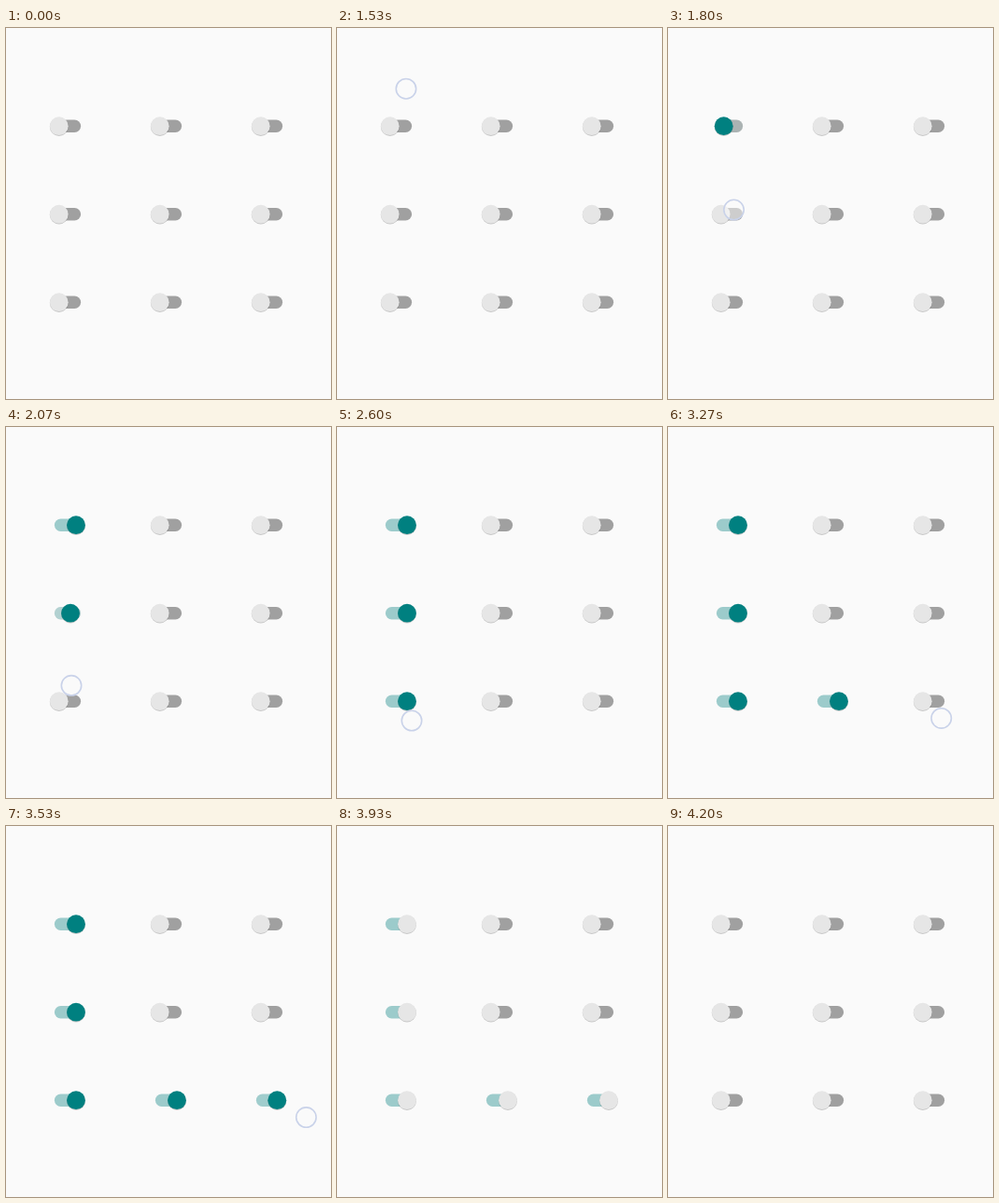
Write an HTML page that moves like this. It is 348x398 px and loops after 4.27 s.

```html
<!DOCTYPE html>
<html lang="en">
<head>
<meta charset="utf-8">
<title>Switches</title>
<style>
  html, body { margin: 0; width: 100%; height: 100%; overflow: hidden; background: #fafafa; }
  svg { display: block; width: 348px; height: 398px; }
</style>
</head>
<body>
<svg id="stage" viewBox="0 0 348 398"></svg>
<script>
const LOOP = 4270, STEP = 1000 / 15;
const TOGGLE = 250, RESET = 3925, TRAVEL = 18.2;
const SHOW = 1530, TURN = 2600, HIDE = 3730;
const FADE = HIDE - STEP;

// Moment at which each touched switch turns on, keyed by "column,row".
const turnOn = { '0,0': 1735, '0,1': 1914, '0,2': 2230, '1,2': 2996, '2,2': 3315 };

const stage = document.getElementById('stage');

function add(parent, tag, attrs) {
  const node = document.createElementNS('http://www.w3.org/2000/svg', tag);
  for (const key in attrs) node.setAttribute(key, attrs[key]);
  return parent.appendChild(node);
}

const clamp = v => Math.min(1, Math.max(0, v));

function eased(time, start) {
  return (1 - Math.cos(Math.PI * clamp((time - start) / TOGGLE))) / 2;
}

// S-curve: power sets the steepness, a smaller lag moves the middle earlier.
function swing(p, power, lag) {
  const done = p ** power;
  return done / (done + lag * (1 - p) ** power);
}

// Down the first column, then along the bottom row with a small wobble.
function pointerAt(time) {
  if (time < TURN) {
    const p = clamp((time - SHOW) / (TURN - SHOW));
    return [74 + 6 * p - 7 * Math.sin(Math.PI * p), 65 + 250 * swing(p, 1.51, 0.179)];
  }
  const p = clamp((time - TURN) / (FADE - TURN));
  const q = swing(p, 2.37, 0.48);
  const wobble = 7 * Math.sin(3 * Math.PI * p) * (1 - p) ** 2;
  return [80 + 242.5 * q, 315 - 2.5 * q + wobble];
}

function makeSwitch(col, row) {
  const g = add(stage, 'g', { transform: `translate(${56.8 + col * 108} ${105.2 + row * 94.5})` });
  const track = { x: -4.9, y: -6.7, width: 28.2, height: 13.4, rx: 6.7 };
  const offTrack = add(g, 'rect', { ...track, fill: '#a0a0a0' });
  const onTrack = add(g, 'rect', { ...track, fill: '#9ccbcb' });
  const thumb = add(g, 'g', {});
  add(thumb, 'circle', { cy: 0.6, r: 10.1, fill: '#000', opacity: 0.07 });
  add(thumb, 'circle', { cy: 0.8, r: 9.9, fill: '#000', opacity: 0.14 });
  const face = add(thumb, 'circle', { r: 9.9 });
  return { offTrack, onTrack, thumb, face, start: turnOn[`${col},${row}`] ?? Infinity };
}

const switches = [];
for (let row = 0; row < 3; row++)
  for (let col = 0; col < 3; col++) switches.push(makeSwitch(col, row));

const pointer = add(stage, 'circle', {
  r: 10.7, fill: '#fafafa', 'fill-opacity': 0.5, stroke: '#c9d2e9', 'stroke-width': 1.6
});

function draw(now) {
  const time = Math.floor((now % LOOP + 5) / STEP) * STEP;

  for (const { offTrack, onTrack, thumb, face, start } of switches) {
    const on = time >= start && time < RESET;
    const p = start < RESET ? eased(time, start) - eased(time, RESET) : 0;
    offTrack.setAttribute('opacity', 1 - p);
    onTrack.setAttribute('opacity', p);
    thumb.setAttribute('transform', `translate(${p * TRAVEL} 0)`);
    face.setAttribute('fill', on ? '#008080' : '#e6e6e6');
  }

  const [x, y] = pointerAt(time);
  pointer.setAttribute('cx', x);
  pointer.setAttribute('cy', y);
  const visible = time >= SHOW && time < HIDE;
  pointer.setAttribute('opacity', !visible ? 0 : time > FADE ? 0.5 : 1);
}

const origin = performance.now();
function tick() {
  draw(performance.now() - origin);
  requestAnimationFrame(tick);
}
tick();
</script>
</body>
</html>
```
